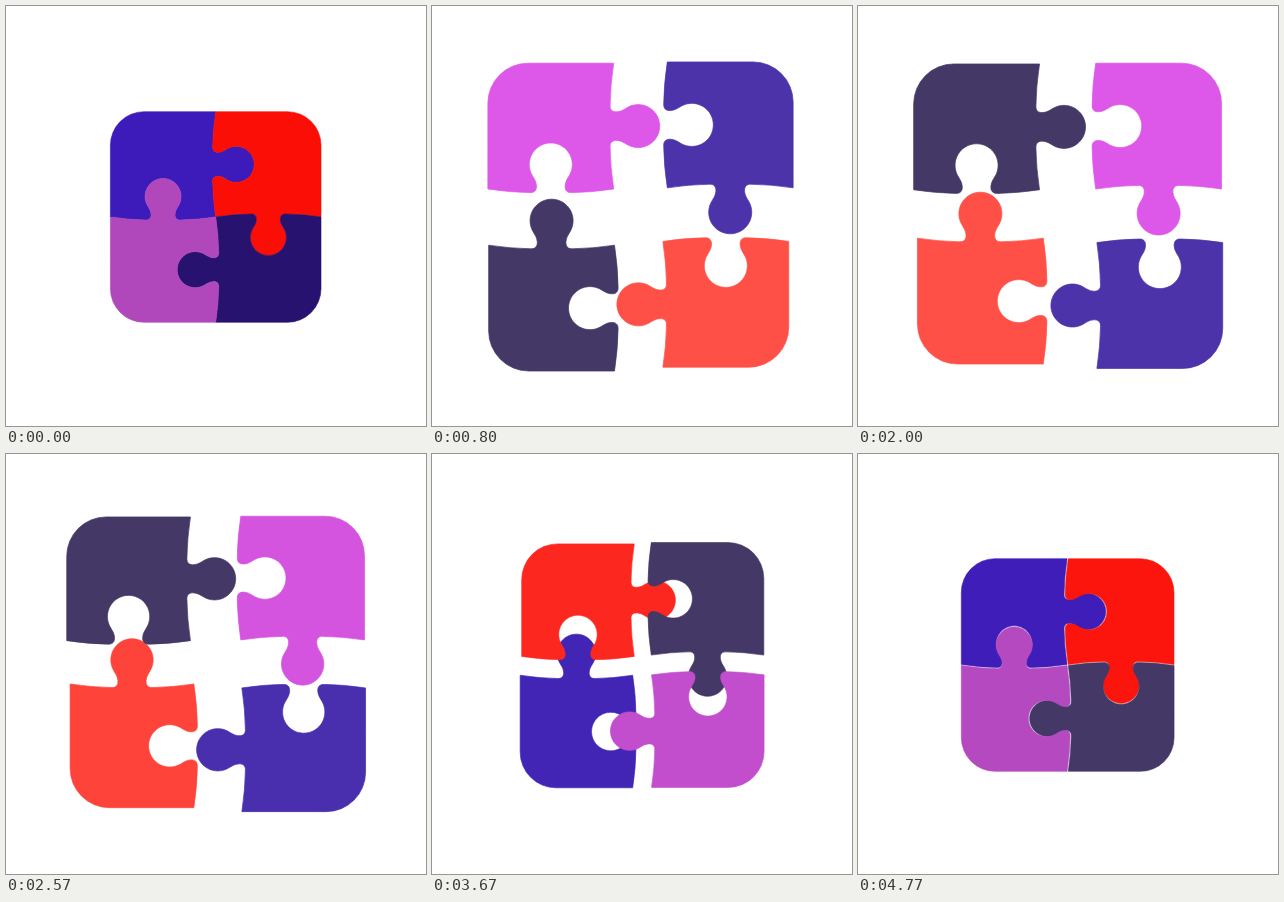
These frames come from a looping animation (420x420 px, 4810 ms). An HTML page with a canvas:

```html
<!DOCTYPE html>
<html lang="en">
<head>
<meta charset="utf-8">
<title>Puzzle</title>
<style>
  html, body { margin: 0; width: 100%; height: 100%; overflow: hidden; background: #fff; }
  canvas { display: block; width: 420px; height: 420px; }
</style>
</head>
<body>
<canvas id="stage" width="420" height="420"></canvas>
<script>
const ctx = document.getElementById('stage').getContext('2d');
const LOOP = 4810, CYCLE = 30;
const CENTER = [209.7, 211];
const SIZE = 105.3, CORNER = 33.5, GROWTH = 0.195;

// Clockwise from top left; "away" is the fully spread offset in the piece's own frame.
const pieces = [
  { closed: [60, 27, 186], open: [76, 51, 170], away: [-29.2, -25.6] },
  { closed: [250, 14, 5], open: [255, 80, 72], away: [-21.2, -24.4] },
  { closed: [40, 18, 112], open: [67, 56, 102], away: [-28.2, -27.2], staysOpen: true },
  { closed: [176, 72, 188], open: [221, 87, 232], away: [-28, -28] }
];

// One jigsaw edge: u points out along the knob, w runs along the edge.
function addEdge(path, map) {
  const half = SIZE / 2, knobU = 20.5, knobR = 18;
  const curve = (...p) => path.bezierCurveTo(...map(p[0], p[1]), ...map(p[2], p[3]), ...map(p[4], p[5]));
  const sweep = (u, w, u2, w2) => path.quadraticCurveTo(...map(u, w), ...map(u2, w2));
  sweep(-2.8, -34, -3, -17.5);
  curve(-3.2, -13.5, -1, -11.7, 3, -12);
  curve(6.5, -12.3, 8.5, -13.9, 11.5, -15.6);
  for (let deg = -120; deg <= 120; deg += 5) {
    const a = deg * Math.PI / 180;
    path.lineTo(...map(knobU + knobR * Math.cos(a), knobR * Math.sin(a)));
  }
  curve(8.5, 13.9, 6.5, 12.3, 3, 12);
  curve(-1, 11.7, -3.2, 13.5, -3, 17.5);
  sweep(-2.8, 34, 0, half);
}

function makePiece() {
  const path = new Path2D(), half = SIZE / 2;
  path.moveTo(0, -SIZE);
  addEdge(path, (u, w) => [u, w - half]);
  addEdge(path, (u, w) => [-w - half, -u]);
  path.lineTo(-SIZE, CORNER - SIZE);
  path.arcTo(-SIZE, -SIZE, CORNER - SIZE, -SIZE, CORNER);
  path.closePath();
  return path;
}

function bezierEase(x1, y1, x2, y2) {
  const at = (a, b, s) => 3 * a * s * (1 - s) ** 2 + 3 * b * s * s * (1 - s) + s ** 3;
  return x => {
    let lo = 0, hi = 1;
    for (let i = 0; i < 24; i++) {
      const mid = (lo + hi) / 2;
      if (at(x1, x2, mid) < x) lo = mid; else hi = mid;
    }
    return at(y1, y2, lo);
  };
}

const clamp = x => Math.min(1, Math.max(0, x));
const smooth = x => x * x * (3 - 2 * x);
const turnEase = bezierEase(0.167, 0, 0.833, 1);
const closeEase = bezierEase(0.167, 0.167, 0.667, 1);
const shape = makePiece();

// 25 steps per second, shown on a 30 per second clock.
function stepAt(ms) {
  const tick = Math.min(143, Math.floor((ms + 4) * 0.03));
  return Math.ceil(tick * 5 / 6 - 0.5);
}

function draw(ms) {
  const step = stepAt(ms), cycle = Math.floor(step / CYCLE), p = step % CYCLE;
  const opening = clamp(p / 5), closing = clamp((p - 20) / 10);
  const spread = p <= 20 ? smooth(opening) : 1 - closeEase(closing);
  const tint = p <= 20 ? opening : 1 - closing;
  const turn = cycle + (p >= 20 ? 1 : p <= 4 ? 0 : turnEase((p - 4) / 16));

  ctx.setTransform(1, 0, 0, 1, 0, 0);
  ctx.fillStyle = '#fff';
  ctx.fillRect(0, 0, 420, 420);
  ctx.lineWidth = 0.6;
  ctx.lineJoin = 'round';

  pieces.forEach((piece, i) => {
    const mix = piece.staysOpen && step >= 5 ? 1 : tint;
    const rgb = piece.closed.map((c, k) => Math.round(c + (piece.open[k] - c) * mix));
    const scale = 1 + GROWTH * spread;
    ctx.setTransform(1, 0, 0, 1, ...CENTER);
    ctx.rotate((turn + i) * Math.PI / 2);
    ctx.translate(piece.away[0] * spread, piece.away[1] * spread);
    ctx.scale(scale, scale);
    ctx.fillStyle = ctx.strokeStyle = `rgb(${rgb})`;
    ctx.fill(shape);
    ctx.stroke(shape);
  });
}

const start = performance.now();
function frame() {
  draw((performance.now() - start) % LOOP);
  requestAnimationFrame(frame);
}
frame();
</script>
</body>
</html>
```
